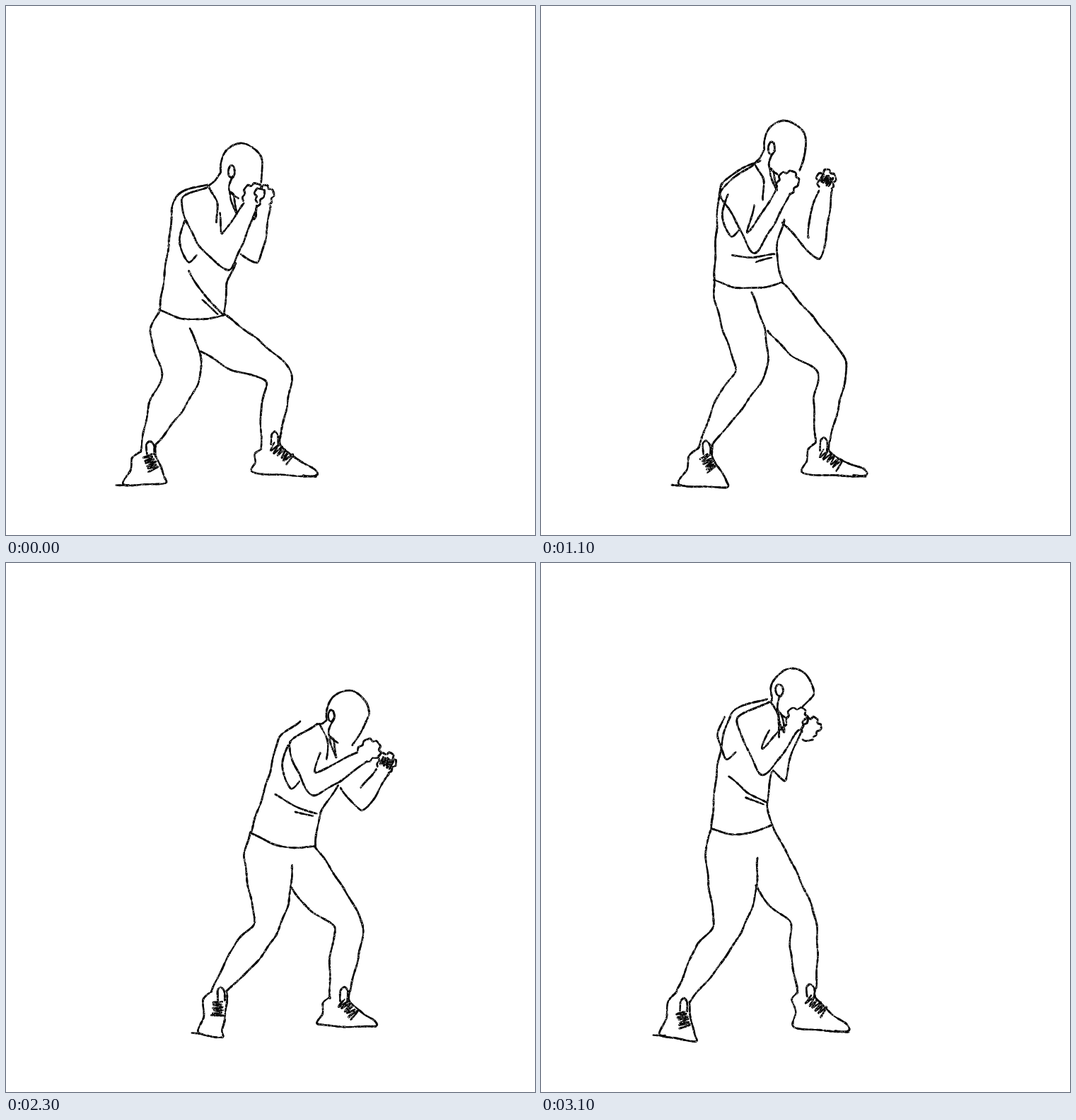
An HTML page with a canvas that plays this animation: 748 px wide and 748 px high, repeating every 3.2 s.

```html
<!DOCTYPE html>
<html lang="en">
<head>
<meta charset="utf-8">
<title>Shadow boxer</title>
<style>
html, body { margin: 0; width: 100%; height: 100%; overflow: hidden; background: #fff; }
canvas { display: block; width: 100%; height: 100%; }
</style>
</head>
<body>
<canvas id="stage" width="748" height="748"></canvas>
<script>
const STEP = 100, STEPS = 32;
const ctx = document.getElementById('stage').getContext('2d');

// A pose holds only joints; the outlines are derived from them in figure().
//   head: centre, ear, chin          near: collar, deltoid, upper arm, elbow, bend, fist
//   far: armpit, elbow, top, bend, fist   rear, lead: hip side, knee, ankle
//   rearIn, leadIn: crotch, knee, ankle   shoes: heel, toe
const pose = parts => Object.fromEntries(Object.entries(parts).map(([name, text]) =>
  [name, text.split(' ').map(p => p.split(',').map(Number))]));

const crouch = pose({
  head: '333,227 319,234 360,249',
  back: '284,252 240,270 231,330 217,430', front: '325,364 313,390 309,436',
  armhole: '257,362', fold: '258,375 306,436',
  near: '284,256 248,275 270,334 313,373 306,321 350,267', far: '332,350 355,363 350,302 354,297 365,268',
  rear: '204,460 221,525 190,630', rearIn: '260,456 273,530 212,620', rearShoe: '166,676 226,674',
  lead: '402,515 388,606', leadIn: '276,488 367,530 361,626', leadShoe: '348,659 438,664'
});
const hook = pose({
  head: '360,190 338,198 373,240',
  back: '294,302 297,325 298,345 300,374', front: '383,296 385,330 395,363',
  armhole: '381,296', fold: '316,358 371,315',
  near: '317,214 278,230 266,270 264,305 285,262 350,236', far: '388,262 467,292 378,222 453,266 520,210',
  rear: '284,425 276,516 268,605', rearIn: '350,430 303,517 289,605', rearShoe: '244,660 288,664',
  lead: '426,487 483,598', leadIn: '345,422 395,507 465,600', leadShoe: '447,649 503,653'
});
const guard = pose({
  head: '345,195 326,201 366,233',
  back: '310,218 257,250 248,320 245,388', front: '344,302 333,345 341,390',
  armhole: '268,326', fold: '270,353 330,351',
  near: '300,224 254,262 275,302 300,349 293,320 349,249', far: '341,305 392,358 378,328 380,298 403,246',
  rear: '245,412 275,515 222,626', rearIn: '298,405 319,515 242,620', rearShoe: '195,676 264,680',
  lead: '431,503 408,615', leadIn: '321,459 391,517 388,618', leadShoe: '369,660 459,664'
});
const duck = pose({
  head: '461,212 446,212 470,249',
  back: '383,236 360,260 344,318 327,378', front: '408,332 422,360 439,386',
  armhole: '368,286', fold: '365,317 412,352',
  near: '422,221 380,245 388,292 408,331 414,292 472,265', far: '424,353 438,340 476,268 478,270 483,272',
  rear: '316,408 360,513 294,602', rearIn: '387,412 398,532 305,610', rearShoe: '274,668 311,670',
  lead: '474,497 475,600', leadIn: '403,485 442,519 450,605', leadShoe: '440,653 522,656'
});
const advance = pose({
  head: '483,213 460,216 490,258',
  back: '416,224 386,248 372,300 346,381', front: '470,315 445,353 437,400',
  armhole: '402,318', fold: '380,327 440,355',
  near: '440,228 401,255 414,298 433,328 438,296 514,265', far: '473,318 502,350 501,318 516,302 538,282',
  rear: '337,412 351,508 290,606', rearIn: '405,427 378,532 312,605', rearShoe: '272,664 307,670',
  lead: '504,510 486,605', leadIn: '404,460 465,515 458,615', leadShoe: '441,652 522,655'
});
const retreat = pose({
  head: '327,175 316,181 352,203',
  back: '302,199 262,210 246,280 238,366', front: '322,315 313,345 327,383',
  armhole: '267,295', fold: '270,317 306,348',
  near: '293,200 260,235 280,290 308,322 303,284 358,218', far: '320,333 332,322 340,285 346,272 362,250',
  rear: '224,402 250,530 186,618', rearIn: '302,405 295,537 210,625', rearShoe: '168,666 220,675',
  lead: '371,503 371,605', leadIn: '303,475 331,515 352,617', leadShoe: '338,650 423,658'
});
const settle = pose({
  head: '355,182 337,180 370,203',
  back: '320,192 270,212 250,285 241,376', front: '326,296 320,340 326,370',
  armhole: '262,277', fold: '266,302 320,340',
  near: '322,197 278,220 293,265 313,300 313,262 362,220', far: '328,293 346,308 370,250 374,252 382,232',
  rear: '233,405 244,512 192,606', rearIn: '306,417 285,518 210,620', rearShoe: '168,666 219,676',
  lead: '387,498 389,600', leadIn: '303,455 352,507 363,607', leadShoe: '358,656 434,662'
});

const lerp = (a, b, t) => a + (b - a) * t;
const mix = (p, q, t) => [lerp(p[0], q[0], t), lerp(p[1], q[1], t)];
const add = ([x, y], dx, dy) => [x + dx, y + dy];
const distance = (p, q) => Math.hypot(q[0] - p[0], q[1] - p[1]);
const noise = n => { const s = Math.sin(n * 12.9898) * 43758.5453; return s - Math.floor(s); };
const range = (n, make) => Array.from({ length: n }, (_, i) => make(i));

// Point at t between p and q, pushed sideways.
function bulge(p, q, t, push) {
  const len = distance(p, q) || 1;
  return add(mix(p, q, t), -(q[1] - p[1]) / len * push, (q[0] - p[0]) / len * push);
}

const mapPose = (joints, move) => Object.fromEntries(
  Object.entries(joints).map(([name, points]) => [name, points.map((p, i) => move(p, name, i))]));

// Feet stay on the ground while the upper body rises.
const shift = (joints, dx, dy) => mapPose(joints, ([x, y]) =>
  [x + dx, y + dy * Math.max(0, Math.min(1, (650 - y) / 300))]);

function punch(joints, arm, fist) {
  if (arm === 'far') {
    const [root, , top] = joints.far;
    return { ...joints, far: [root, add(mix(root, fist, .5), 0, 10), top, add(mix(top, fist, .5), 0, 2), fist] };
  }
  const [top, deltoid] = joints.near;
  const along = (t, dy) => add(mix(top, fist, t), 0, dy);
  return { ...joints, near: [top, deltoid, along(.15, 34), along(.5, 18), along(.45, -12), fist] };
}

const keys = [
  [0, crouch],
  [4, punch(shift(hook, 0, -12), 'far', [560, 210])],
  [7, hook],
  [9, punch(shift(guard, 15, -10), 'far', [575, 215])],
  [11, guard],
  [13, shift(retreat, 22, -9)],
  [15, punch(shift(duck, -15, -15), 'near', [582, 212])],
  [18, duck],
  [20, punch(shift(advance, -70, -27), 'far', [577, 215])],
  [23, advance],
  [26, retreat],
  [27, shift(retreat, -22, -6)],
  [30, shift(settle, 0, -19)],
  [31, settle],
  [32, crouch]
];

function poseAt(step) {
  const i = keys.findIndex(([at]) => at > step) - 1;
  const [start, from] = keys[i], [end, to] = keys[i + 1];
  return mapPose(from, (p, name, n) => mix(p, to[name][n], (step - start) / (end - start)));
}

let seed = 0;

function curve(points) {
  const at = i => points[Math.max(0, Math.min(points.length - 1, i))];
  const dense = [];
  for (let i = 0; i < points.length - 1; i++) {
    const a = at(i), b = at(i + 1), count = Math.ceil(distance(a, b) / 2);
    for (let k = 0; k < count; k++) {
      const t = k / count, t2 = t * t, t3 = t2 * t;
      dense.push([0, 1].map(c => {
        const ma = (b[c] - at(i - 1)[c]) * .4, mb = (at(i + 2)[c] - a[c]) * .4;
        return (2 * t3 - 3 * t2 + 1) * a[c] + (t3 - 2 * t2 + t) * ma + (3 * t2 - 2 * t3) * b[c] + (t3 - t2) * mb;
      }));
    }
  }
  return [...dense, at(points.length)];
}

// Grainy pencil line: width and darkness vary, with small worn spots.
function pencil(...points) {
  const base = ++seed * 131;
  const line = curve(points).map(([x, y], i) =>
    [x + Math.sin(base + i * .31) * .6, y + Math.sin(base * 2 + i * .23) * .6]);
  for (let i = 1; i < line.length; i++) {
    const grain = noise(base + i);
    ctx.lineWidth = 1.7 + noise(base + i * 1.7) * 1.5;
    ctx.strokeStyle = `rgba(10,10,10,${grain < .12 ? .55 : 1})`;
    ctx.beginPath();
    ctx.moveTo(...line[i - 1]);
    ctx.lineTo(...line[i]);
    ctx.stroke();
  }
  ctx.fillStyle = '#fff';
  line.forEach(([x, y], i) => {
    if (noise(base + i * 3.7) < .28) ctx.fillRect(x - 1.5 + noise(base - i) * 2, y - 1.5 + noise(base + i * 2.3) * 2, 1, 1);
  });
}

function scribble(p, q, width) {
  pencil(...range(12, i => bulge(p, q, i / 11, (i % 2 ? 1 : -1) * width * (.7 + noise(i) * .5))));
}

function head([centre, ear, chin], collar) {
  const arc = range(11, i => {
    const a = (165 + i * 20.5) * Math.PI / 180;
    return add(centre, 30 * Math.cos(a), 32.5 * Math.sin(a));
  });
  pencil(...arc, chin);
  pencil(arc[0], bulge(arc[0], collar, .5, -2), collar);
  pencil(...range(8, i => add(ear, 5 * Math.sin(i + .5), 9 * Math.cos(i + .5))));
  const throat = add(ear, -2, 29);
  pencil(add(ear, 1, 8), add(ear, -3, 20), throat, add(ear, 9, 38));
  pencil(throat, add(throat, 5, 5), add(throat, 9, 30), add(throat, 2, 14), throat);
}

function forearm(elbow, bend, fist, radius, before, inner) {
  const len = distance(elbow, fist) || 1;
  const d = [(fist[0] - elbow[0]) / len, (fist[1] - elbow[1]) / len];
  const side = d[0] * (bend[1] - elbow[1]) > d[1] * (bend[0] - elbow[0]) ? -1 : 1;
  const place = (u, v) => add(fist, d[0] * u - d[1] * v * side, d[1] * u + d[0] * v * side);
  pencil(...before, elbow, bulge(elbow, place(-13, 10), .4, side * 4), place(-13, 10));
  pencil(...inner, bend, place(-15, -9));
  pencil(...range(17, i => {
    const a = -2.4 + i * .3, r = radius + (i % 4 === 2 ? -2.5 : 1);
    return place(r * Math.cos(a), r * .9 * Math.sin(a));
  }));
}

function shoe([heel, toe], ankle, front) {
  pencil(ankle, add(mix(ankle, heel, .2), -7, 0), mix(ankle, heel, .6), heel,
    add(mix(heel, toe, .5), 0, 2), toe, add(toe, -2, -9), add(mix(toe, front, .45), 0, 5), add(front, 0, 16), front);
  pencil(add(front, -13, 14), add(front, -13, 0), add(front, -8, -5), add(front, -3, 1), add(front, -3, 14));
  const top = add(front, -11, 15);
  scribble(top, add(top, (toe[0] - front[0]) * .5, 21), 7);
}

function figure(j) {
  const [collar, deltoid, upper, elbow, bend, fist] = j.near;
  head(j.head, collar);

  const hemBack = j.back[3], hemFront = j.front[2], [hole] = j.armhole, [f1, f2] = j.fold;
  pencil(...j.back);
  pencil(...j.front);
  pencil(hemBack, add(mix(hemBack, hemFront, .3), 0, 9), add(mix(hemBack, hemFront, .7), 0, 9), hemFront);
  pencil(add(hole, -3, -60), add(hole, -12, -32), hole, add(hole, 13, -9));
  pencil(add(collar, 3, 0), add(collar, 14, 20), add(collar, 14, 50));
  pencil(f1, bulge(f1, f2, .5, 3), f2);
  pencil(bulge(f1, f2, .55, 10), bulge(f1, f2, .95, 5));

  forearm(elbow, bend, fist, 16, [collar, deltoid, upper], [bulge(bend, collar, .4, 6)]);
  const [armpit, farElbow, farTop, farBend, farFist] = j.far;
  const reach = distance(farBend, farTop) > 50;
  forearm(farElbow, farBend, farFist, 14, [armpit], reach
    ? [farTop, bulge(farTop, farBend, .4, -9), bulge(farTop, farBend, .75, -9)] : [farTop]);
  if (distance(fist, farFist) > 26) scribble(add(farFist, -7, -5), add(farFist, 7, 4), 6);

  const [seat, knee, ankle] = j.rear, [crotch, kneeIn, ankleIn] = j.rearIn;
  pencil(hemBack, seat, bulge(seat, knee, .5, 1), knee, bulge(knee, ankle, .35, 7), ankle);
  pencil(crotch, bulge(crotch, kneeIn, .5, -8), kneeIn, bulge(kneeIn, ankleIn, .5, -4), ankleIn);
  const [leadKnee, leadAnkle] = j.lead, [fork, leadKneeIn, leadAnkleIn] = j.leadIn;
  pencil(hemFront, bulge(hemFront, leadKnee, .5, -3), leadKnee, bulge(leadKnee, leadAnkle, .5, -3), leadAnkle);
  pencil(fork, bulge(fork, leadKneeIn, .5, 6), leadKneeIn, bulge(leadKneeIn, leadAnkleIn, .4, 4), leadAnkleIn);

  shoe(j.rearShoe, ankle, ankleIn);
  shoe(j.leadShoe, leadAnkleIn, leadAnkle);
  pencil(add(j.rearShoe[0], -10, 1), add(j.rearShoe[0], 8, 2));
  pencil(add(j.leadShoe[1], -18, 0), add(j.leadShoe[1], 1, 1));
}

function draw(step) {
  seed = step * 41;
  ctx.fillStyle = '#fff';
  ctx.fillRect(0, 0, 748, 748);
  ctx.lineCap = ctx.lineJoin = 'round';
  figure(poseAt(step));
}

const begin = performance.now();
let shown = -1;
function tick() {
  const step = Math.floor((performance.now() - begin) / STEP) % STEPS;
  if (step !== shown) draw(shown = step);
  requestAnimationFrame(tick);
}
tick();
</script>
</body>
</html>
```
